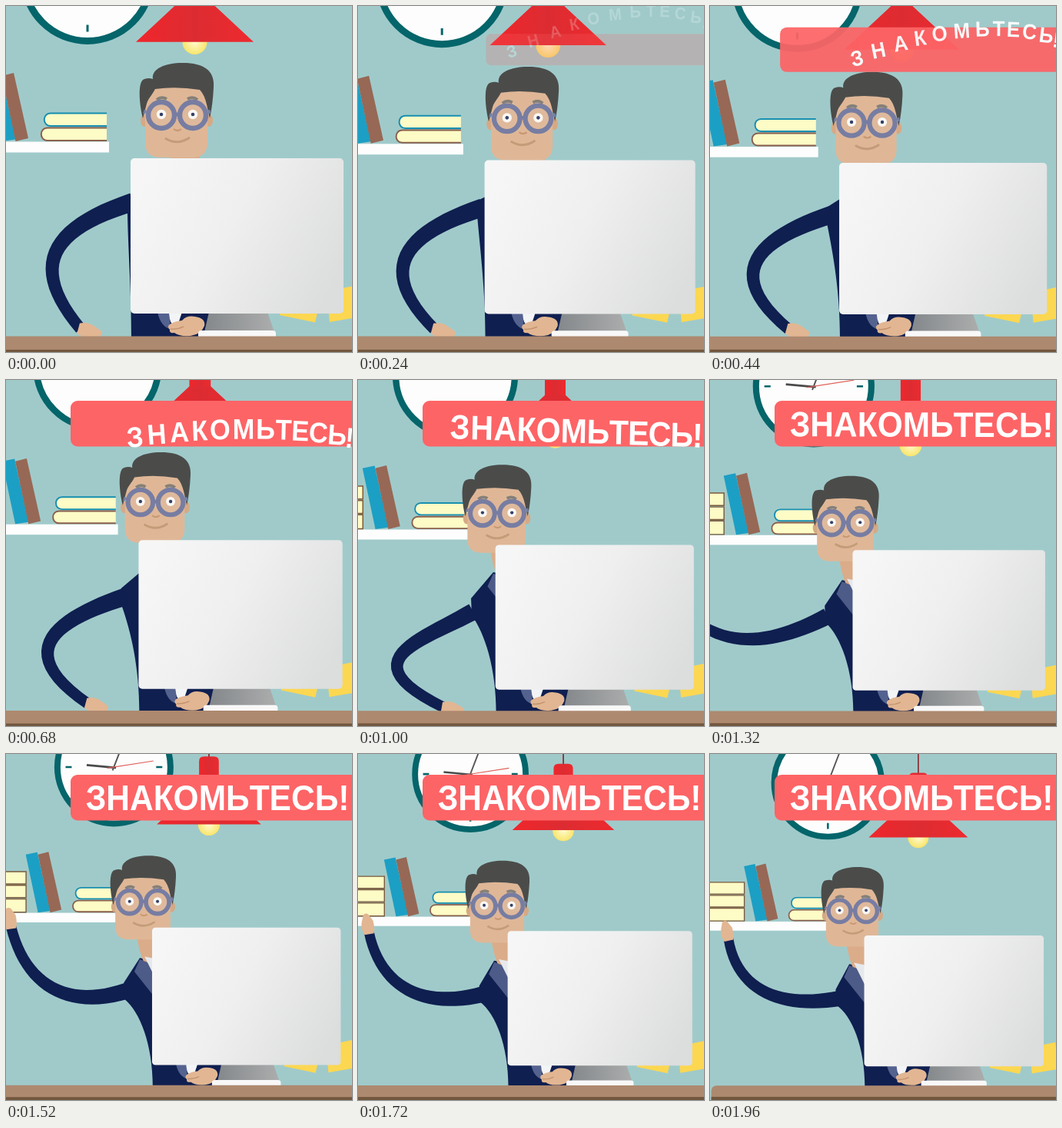
Animation, 450 px wide and 450 px high, one loop 2 s. Source, as an HTML page:

```html
<!DOCTYPE html>
<html lang="ru">
<head>
<meta charset="utf-8">
<title>Знакомьтесь!</title>
<style>
  html, body { margin: 0; width: 100%; height: 100%; overflow: hidden; background: #a0caca; }
  svg { display: block; width: 100vw; height: 100vh; }
  text { font: 700 42.5px "Liberation Sans", Arial, sans-serif; fill: #fff; text-anchor: middle; }
</style>
</head>
<body>
<svg viewBox="0 0 450 450">
  <defs>
    <linearGradient id="screen" x1="0" y1=".3" x2="1" y2=".7">
      <stop offset="0" stop-color="#f6f6f6"/><stop offset=".45" stop-color="#efefef"/><stop offset="1" stop-color="#dcdddd"/>
    </linearGradient>
    <linearGradient id="stand">
      <stop offset="0" stop-color="#84888b"/><stop offset="1" stop-color="#acadad"/>
    </linearGradient>
    <linearGradient id="shade">
      <stop offset="0" stop-color="#f0262b"/><stop offset=".5" stop-color="#dc2c32"/><stop offset="1" stop-color="#ee2a2e"/>
    </linearGradient>
    <radialGradient id="bulb">
      <stop offset="0" stop-color="#fffbd0"/><stop offset="1" stop-color="#f8e56c"/>
    </radialGradient>
  </defs>
  <rect width="450" height="450" fill="#a0caca"/>

  <g id="scene">
    <g id="clock" transform="translate(106 -37.500)">
      <circle r="83" fill="#fcfdfc" stroke="#04656a" stroke-width="9"/>
      <path d="M0 62V71M0 -62V-71M62 0H71M-62 0H-71" stroke="#04656a" stroke-width="3"/>
      <path d="M3 1L-40 -3" stroke="#4a4a4a" stroke-width="3"/>
      <path d="M-2 5L20 -52" stroke="#555" stroke-width="2.200"/>
      <path d="M-10 1.500L58 -9" stroke="#e0605a" stroke-width="1.300"/>
    </g>

    <g id="lamp">
      <path d="M245.500 -110V-50" stroke="#8c2a30" stroke-width="2"/>
      <circle cx="245.500" cy="47" r="16" fill="url(#bulb)"/>
      <path d="M231 -10V-46Q231 -53 238 -53H253Q260 -53 260 -46V-10Z" fill="url(#shade)"/>
      <path d="M231 -11H260L322 46.700H169Z" fill="url(#shade)"/>
    </g>

    <g id="shelf">
      <rect x="-120" y="176.500" width="254" height="14" fill="#fdfdfd"/>
      <g fill="#fdfbc6" stroke-width="2">
        <path d="M131 139.500H58C47 139.500 47 156 58 156H131" stroke="#168fb0"/>
        <path d="M131 158.500H54C43 158.500 43 175 54 175H131" stroke="#8a5f4d"/>
        <path d="M-120 116H-23V134H-120M-120 136H-23V154H-120M-120 156H-23V175.500H-120" stroke="#7b5a3c" stroke-width="1.600"/>
      </g>
      <path d="M-23.500 91L-6.500 87.500L12.500 173.500L-5.500 176Z" fill="#1c9fc4"/>
      <path d="M-5.500 91L10 87L29 172L12.500 176Z" fill="#976856"/>
    </g>

    <path d="M356 380L408 386L402 411.500L356 402Z" fill="#fcd751"/>
    <path d="M417 371L457 363L462 404L421 411Z" fill="#fcd751"/>

    <path id="torso" fill="#0f1f50"/>
    <path d="M196 392H214L213 420Q199 416 196 392" fill="#54628f"/>
    <path d="M211 392H231L223 416Q215 417 213 407Z" fill="#f3f4f6"/>
    <path d="M213 414Q219 410 229 409Q235 402 246 404Q260 406 258 416Q254 427 240 429Q225 430 219 425Q212 426 213 421Q209 417 213 414" fill="#e2b692"/>
    <path d="M214 420Q223 421 231 417" fill="none" stroke="#c3936f" stroke-width="1.500"/>

    <g id="upper">
      <path d="M212 185H252V240H227Q214 212 212 185" fill="#dbac89"/>
      <path d="M217 226L209 244L247 292V238Z" fill="#4d5b88"/>
      <path d="M224 222L245 264V226Z" fill="#e6e9ec"/>
      <g id="head">
        <ellipse cx="180" cy="149" rx="5" ry="8" fill="#d5a985"/>
        <ellipse cx="264" cy="149" rx="5" ry="8" fill="#d5a985"/>
        <path d="M181 105H262V178Q262 197 242 197H201Q181 197 181 178Z" fill="#dfb797"/>
        <path d="M178 146C173 126 171 97 180 95Q186 93 191 95C189 82 206 74 230 74C257 74 272 84 270 106Q269 128 265 146L261 128Q258 115 252 109Q221 104 194 108C190 116 185 120 183 127Z" fill="#4b4c4a"/>
        <path d="M196 122Q202 117 209 121M236 121Q243 117 249 122" fill="none" stroke="#858078" stroke-width="4"/>
        <path d="M220 141H226M182 138L179 137M263 138L266 137" stroke="#777da2" stroke-width="5"/>
        <g id="eyes"></g>
        <path d="M218 160Q223 164 228 160" fill="none" stroke="#c89873" stroke-width="2.200"/>
        <path d="M207 172Q223 182 239 171" fill="none" stroke="#c49c79" stroke-width="3"/>
      </g>
    </g>
    <path id="arm" fill="#0f1f50"/>
    <path id="hand" d="M-3 -7Q7 -12 17 -8L27 -4Q30 0 26 4L16 9Q5 10 -3 7Z" fill="#e2b692"/>

    <path d="M264 398H340L349 424H258Z" fill="url(#stand)"/>
    <rect x="250" y="422" width="101" height="11" rx="4" fill="#f8f8f8"/>
    <rect x="162" y="198" width="277" height="202" rx="5" fill="url(#screen)"/>
    <rect x="-74" y="429.500" width="620" height="40" rx="8" fill="#ad896f"/>
    <rect x="-74" y="447" width="620" height="20" fill="#72573f"/>
  </g>

  <g id="banner">
    <rect id="plate" x="84" y="27" width="530" height="59.500" rx="9" fill="#fd6466"/>
    <g id="title"></g>
  </g>
</svg>
<script>
const NS = 'http://www.w3.org/2000/svg';
const $ = id => document.getElementById(id);
const lerp = (a, b, p) => a + (b - a) * p;
const ease = p => (1 - Math.cos(Math.PI * Math.min(1, Math.max(0, p)))) / 2;

function add(parent, tag, attrs, content = '') {
  const el = document.createElementNS(NS, tag);
  for (const name in attrs) el.setAttribute(name, attrs[name]);
  el.textContent = content;
  return parent.appendChild(el);
}

// Linear interpolation between rows of [step, ...values].
function keyed(rows, step) {
  let i = 0;
  while (i < rows.length - 2 && step > rows[i + 1][0]) i++;
  const [a, b] = [rows[i], rows[i + 1]];
  const p = Math.min(1, Math.max(0, (step - a[0]) / (b[0] - a[0])));
  return a.slice(1).map((v, j) => lerp(v, b[j + 1], p));
}

for (const cx of [202, 243]) {
  add($('eyes'), 'circle', { cx, cy: 142, r: 17, fill: '#dfb99c', stroke: '#777da2', 'stroke-width': 6.4 });
  add($('eyes'), 'circle', { cx, cy: 141, r: 6.2, fill: '#faf8f3' });
  add($('eyes'), 'circle', { cx, cy: 141, r: 2.3, fill: '#34406a' });
}

const pen = document.createElement('canvas').getContext('2d');
pen.font = '700 42.5px "Liberation Sans", Arial, sans-serif';
const phrase = [...'ЗНАКОМЬТЕСЬ!'];
const widths = phrase.map(c => pen.measureText(c).width);
let cursor = 275 - widths.reduce((a, b) => a + b) / 2;
const letters = phrase.map((c, i) => {
  const x = cursor + widths[i] / 2;
  cursor += widths[i];
  return { x, u: i / (phrase.length - 1), el: add($('title'), 'text', { y: 15.2 }, c) };
});

// Sideways lean and drop of the upper body.
const leanPoses = [
  [0, 0, 0], [9, -23.6, 2.7], [15, -37.5, 4.5], [23, -58, 12],
  [27, -68, 16], [36, -73, 18.7], [47, -78, 18.2]
];

// Shoulder, two control points, wrist, hand angle.
const armPoses = [
  [0, 165, 255, 55, 290, 30, 340, 97, 420, 15],
  [15, 143, 275, 56, 304, -15, 346, 93, 420, 15],
  [23, 131, 291, 56, 333, -43, 359, 90, 425, 10],
  [27, 128, 295, 72, 336, 18, 355, -61, 358, 180],
  [31, 126, 293, 55, 330, -20, 347, -82, 285, 228],
  [36, 125, 291, 38, 319, -24, 283, -45, 197, 262],
  [47, 125, 295, 37, 311, -34, 286, -47.5, 203, 258]
];

// Height, slope and bend of the text line, then letter size.
const textPoses = [
  [3, 0, -170, 130, .45], [9, 11, -125, 101, .61], [15, 17, -43, 44, .81],
  [23, 4, 11, 0, .97], [27, 1, 5, 0, .99], [32, 0, 0, 0, 1]
];
const letterHeight = 1.08;

function armOutline([x0, y0, x1, y1, x2, y2, x3, y3]) {
  const upper = [], lower = [];
  for (let i = 0; i <= 24; i++) {
    const t = i / 24, r = 1 - t;
    const at = (a, b, c, d) => r * r * r * a + 3 * r * r * t * b + 3 * r * t * t * c + t * t * t * d;
    const slope = (a, b, c, d) => r * r * (b - a) + 2 * r * t * (c - b) + t * t * (d - c);
    const dx = slope(x0, x1, x2, x3), dy = slope(y0, y1, y2, y3);
    const half = (7.5 + 4.5 * r ** 1.5) / Math.hypot(dx, dy);
    const x = at(x0, x1, x2, x3), y = at(y0, y1, y2, y3);
    upper.push([x - dy * half, y + dx * half]);
    lower.unshift([x + dy * half, y - dx * half]);
  }
  return 'M' + upper.concat(lower).map(p => p.map(v => v.toFixed(2))).join('L') + 'Z';
}

function drawPerson(step) {
  const [lean, drop] = keyed(leanPoses, step);
  $('upper').setAttribute('transform', `translate(${lean} ${drop})`);
  const x = 157 + .5 * lean, y = 247 - .44 * lean;
  $('torso').setAttribute('d',
    `M${217 + lean} ${224 + drop}L${x} ${y}L${x + 1} ${y + 24}` +
    `C${159 + .2 * lean} 322 163 370 163 432H264V300L${260 + lean} ${232 + drop}Z`);
  const pose = keyed(armPoses, step);
  $('arm').setAttribute('d', armOutline(pose));
  $('hand').setAttribute('transform', `translate(${pose[6]} ${pose[7]}) rotate(${pose[8]})`);
}

function drawBanner(step) {
  const shown = ease((step - 1) / 9.6);
  $('banner').setAttribute('opacity', shown);
  $('plate').setAttribute('transform', `translate(349 56.5) scale(${lerp(.6, 1, shown)}) translate(-349 -56.5)`);
  const [height, slope, bend, size] = keyed(textPoses, step);
  const shift = 83 * (1 - ease((step - 3) / 28));
  for (const { x, u, el } of letters) {
    const dx = shift * Math.cos(1.42 * u);
    const dy = height + slope * u + bend * u * u;
    const turn = .6 * Math.atan((slope + 2 * bend * u) / 300) * 180 / Math.PI;
    el.setAttribute('transform',
      `translate(${x + dx} ${56.7 + dy}) rotate(${turn}) scale(${size} ${size * letterHeight})`);
  }
}

function draw(ms) {
  const t = ms % 2000;
  const step = t < 120 ? 0 : Math.floor((t - 120) / 40) + 1;
  const zoom = 1 - (.72 * step + .0044 * step * step) / 277;
  $('scene').setAttribute('transform', `translate(407 440) scale(${zoom}) translate(-407 -440)`);
  drawPerson(step);
  drawBanner(step);
}

function tick(now) {
  draw(now);
  requestAnimationFrame(tick);
}
draw(0);
requestAnimationFrame(tick);
</script>
</body>
</html>
```
